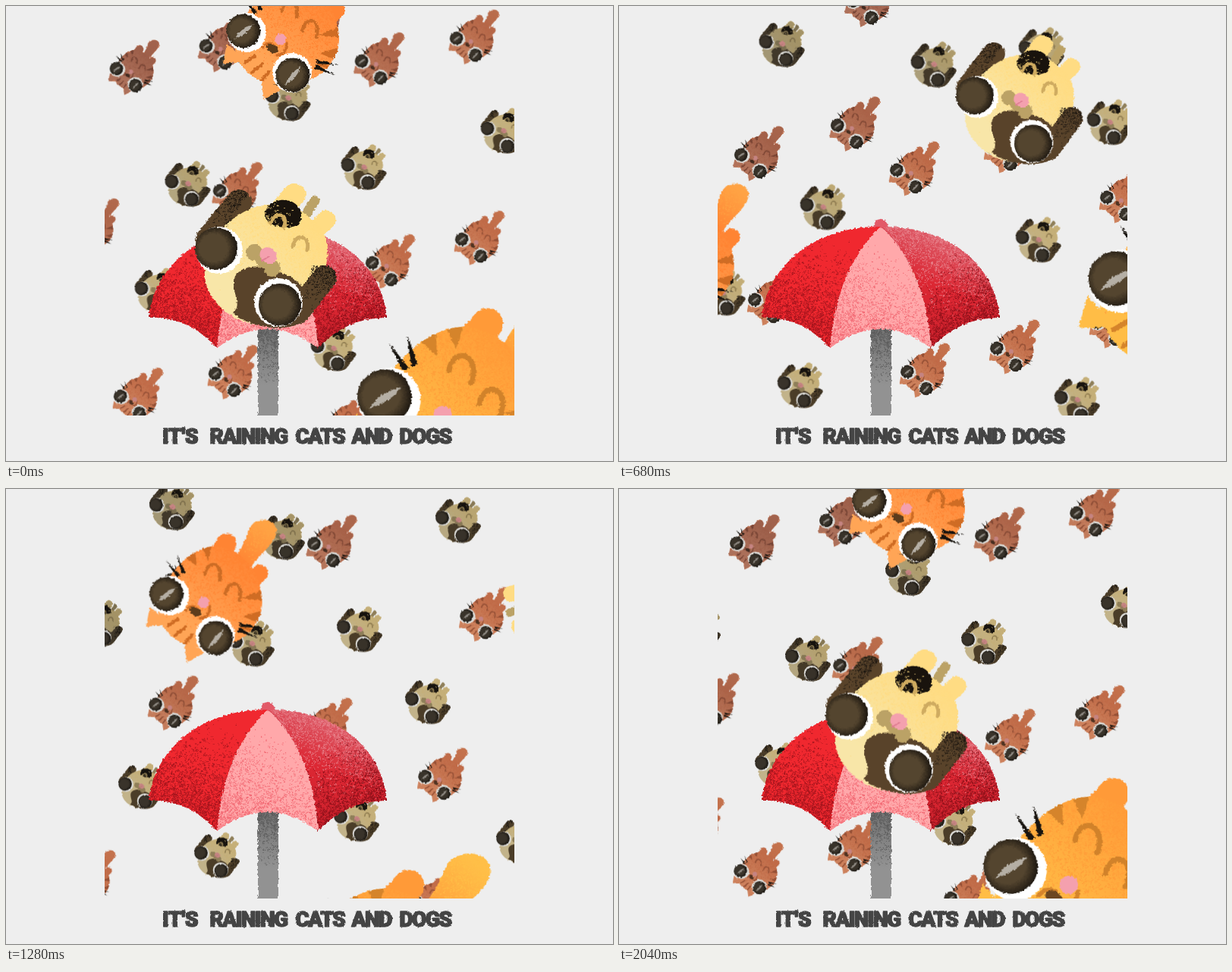
An HTML page with a canvas for the animation above (2080 ms loop, 800 by 600 pixels).

```html
<!DOCTYPE html>
<html lang="en">
<head>
<meta charset="utf-8">
<title>It's raining cats and dogs</title>
<style>
  html, body { margin: 0; width: 800px; height: 600px; overflow: hidden; background: #eee; }
  canvas { position: absolute; left: 130px; top: 0; }
  svg { position: absolute; left: 0; top: 540px; }
  text { font: 900 28px Roboto, sans-serif; letter-spacing: -1.5px; fill: #444; stroke: #444; stroke-width: 1.6; stroke-linejoin: round; }
</style>
</head>
<body>
<canvas id="sky" width="540" height="540"></canvas>
<svg width="800" height="60">
  <filter id="rough" x="-2%" y="-10%" width="104%" height="120%">
    <feTurbulence type="fractalNoise" baseFrequency=".35" numOctaves="2" seed="4"/>
    <feDisplacementMap in="SourceGraphic" scale="2.4" xChannelSelector="R" yChannelSelector="G"/>
  </filter>
  <text y="37" filter="url(#rough)"><tspan x="206" letter-spacing="0">IT'S</tspan><tspan x="263"> RAINING</tspan><tspan x="376"> CATS</tspan><tspan x="450"> AND</tspan><tspan x="513"> DOGS</tspan></text>
</svg>
<script>
const STEP = 40, STEPS = 52, HALF = STEPS / 2, PAD = 4;
const stage = document.getElementById('sky').getContext('2d');
stage.translate(-130, 0);

let seed = 7;
function rand() {
  seed = (seed + 0x6D2B79F5) | 0;
  let t = Math.imul(seed ^ (seed >>> 15), 1 | seed);
  t = (t + Math.imul(t ^ (t >>> 7), 61 | t)) ^ t;
  return ((t ^ (t >>> 14)) >>> 0) / 4294967296;
}
const clamp = v => Math.max(0, Math.min(1, v));

// Small drawing kit in model coordinates
class Pen {
  constructor(g, box, scale) { Object.assign(this, { g, box, scale }); }
  fill(d, style) {
    this.g.fillStyle = style;
    this.g.fill(new Path2D(d));
  }
  line(d, style, width) {
    const g = this.g;
    g.strokeStyle = style;
    g.lineWidth = width;
    g.lineCap = g.lineJoin = 'round';
    g.stroke(new Path2D(d));
  }
  oval(x, y, rx, ry, style, turn = 0) {
    const g = this.g;
    g.beginPath();
    g.ellipse(x, y, rx, ry, turn, 0, 7);
    g.fillStyle = style;
    g.fill();
  }
  disc(x, y, r, style) { this.oval(x, y, r, r, style); }
  ramp(x0, y0, x1, y1, ...colors) {
    const ramp = this.g.createLinearGradient(x0, y0, x1, y1);
    colors.forEach((c, i) => ramp.addColorStop(i / (colors.length - 1), c));
    return ramp;
  }
  clipped(d, paint) {
    this.g.save();
    this.g.clip(new Path2D(d));
    paint();
    this.g.restore();
  }
  // Dots that grow denser from the first point to the second
  grain(d, style, density, x0, y0, x1, y1) {
    const [l, t, r, b] = this.box, k = this.scale, dx = x1 - x0, dy = y1 - y0;
    const size = 1.2 / k, count = (r - l) * (b - t) * k * k * density;
    this.clipped(d, () => {
      this.g.fillStyle = style;
      for (let i = 0; i < count; i++) {
        const x = l + rand() * (r - l), y = t + rand() * (b - t);
        const depth = clamp(((x - x0) * dx + (y - y0) * dy) / (dx * dx + dy * dy));
        if (rand() < depth * depth) this.g.fillRect(x, y, size, size);
      }
    });
  }
  eye(x, y, r, wx, wy, wr, p) {
    this.disc(wx, wy, wr, p.white);
    const glow = this.g.createRadialGradient(x - r * .15, y - r * .05, r * .3, x - r * .1, y, r * 1.1);
    glow.addColorStop(0, p.iris);
    glow.addColorStop(.45, p.iris);
    glow.addColorStop(1, p.rim);
    this.disc(x, y, r, glow);
  }
}

// Crumbles the outlines by shifting tiny blocks
function roughen(canvas, amount) {
  const g = canvas.getContext('2d'), { width: w, height: h } = canvas;
  const from = g.getImageData(0, 0, w, h), to = g.createImageData(w, h);
  const a = new Uint32Array(from.data.buffer), b = new Uint32Array(to.data.buffer);
  const cols = (w >> 1) + 1;
  const shift = Array.from({ length: cols * ((h >> 1) + 1) * 2 }, () => Math.round((rand() * 2 - 1) * amount));
  for (let y = 0; y < h; y++) for (let x = 0; x < w; x++) {
    const i = 2 * ((y >> 1) * cols + (x >> 1)), sx = x + shift[i], sy = y + shift[i + 1];
    if (sx >= 0 && sy >= 0 && sx < w && sy < h) b[y * w + x] = a[sy * w + sx];
  }
  g.putImageData(to, 0, 0);
}

function sprite(draw, box, anchor, scale, palette, amount) {
  const [l, t, r, b] = box, canvas = document.createElement('canvas');
  canvas.width = Math.ceil((r - l) * scale) + 2 * PAD;
  canvas.height = Math.ceil((b - t) * scale) + 2 * PAD;
  const g = canvas.getContext('2d');
  g.translate(PAD, PAD);
  g.scale(scale, scale);
  g.translate(-l, -t);
  draw(new Pen(g, box, scale), palette);
  roughen(canvas, amount);
  return { canvas, x: (anchor[0] - l) * scale + PAD, y: (anchor[1] - t) * scale + PAD };
}

function put(s, x, y, degrees = 0, scale = 1, alpha = 1) {
  stage.save();
  stage.globalAlpha = alpha;
  stage.translate(x, y);
  stage.rotate(degrees * Math.PI / 180);
  stage.scale(scale, scale);
  stage.drawImage(s.canvas, -s.x, -s.y);
  stage.restore();
}

function drawCat(pen, p) {
  const body = 'M150 215C152 185 165 165 178 152C195 132 215 126 228 127C262 130 288 165 287 203C285 228 268 246 250 254C215 269 160 262 150 215Z';
  const tail = 'M246 152Q263 126 269 106C275 88 304 88 306 104C308 122 282 136 266 164Z';
  pen.fill(tail, pen.ramp(256, 150, 292, 98, p.top, p.tip));
  pen.grain(tail, p.tip, .4, 256, 150, 292, 98);
  pen.line('M226 142L240 123', p.top, 26);
  pen.line('M268 178L284 162', p.top, 22);
  pen.fill('M139 206L134 233L164 230ZM184 252L188 280L212 266Z', p.low);
  pen.fill(body, pen.ramp(262, 130, 185, 225, p.top, p.low));
  pen.grain(body, p.top, .5, 170, 250, 270, 125);
  pen.clipped(body, () => {
    pen.fill('M183 140L198 129L201 153ZM206 127L221 124L216 146ZM290 184L290 199L260 195ZM290 211L284 229L261 219Z', p.stripe);
    pen.line('M163 232L176 223M172 245L186 233M184 256L195 243M260 234L275 238', p.stripe, 4);
  });
  pen.line('M212 164C213 145 237 146 231 172M239 189C242 170 264 172 257 198', p.line, 4.5);
  pen.line('M205 222Q217 222 218 206M186 212Q192 204 199 207', p.stripe, 3.5);
  pen.disc(210, 201, 7.5, p.tongue);
  pen.oval(199, 213, 8, 5.5, p.nose, .5);
  pen.eye(161, 190, 22.5, 165, 192, 26, p);
  pen.eye(226, 248, 22.5, 225, 245, 26, p);
  pen.fill('M149 201Q156 187 174 181Q168 193 149 201ZM216 261Q220 247 236 237Q233 251 216 261Z', p.slit);
  pen.fill('M161 146L179 165L174 167ZM175 138L186 161L181 164ZM257 227L286 235L258 233ZM256 234L282 248L255 240Z', '#18140f');
}

function drawDog(pen, p) {
  const body = 'M262 345C258 380 290 415 330 420C380 425 425 370 424 320C422 285 385 262 350 262C310 262 265 300 262 345Z';
  const patch = 'M300 365C300 345 330 338 350 348C385 356 407 380 402 405C390 430 335 432 298 405C312 395 300 385 300 365Z';
  const spot = 'M341 278C340 262 358 252 374 257C390 262 392 280 386 288C372 296 348 292 341 278Z';
  pen.line('M360 272L380 249', p.top, 30);
  pen.line('M402 300L422 282', p.top, 25);
  pen.line('M393 278L407 257', p.tan, 13);
  pen.line('M267 308L307 259', p.brown, 34);
  pen.fill(body, pen.ramp(400, 280, 300, 370, p.top, p.low));
  pen.grain(body, p.top, .5, 290, 390, 410, 270);
  pen.fill(patch, p.brown);
  pen.line('M385 403L420 358', p.brown, 32);
  pen.g.globalCompositeOperation = 'source-atop';
  pen.grain('M244 330V230H331L285 300Z', p.black, .6, 270, 304, 322, 240);
  pen.grain('M380 425L404 342H440V380L412 400Z', p.black, .6, 390, 398, 434, 340);
  pen.g.globalCompositeOperation = 'source-over';
  pen.fill(spot, p.black);
  pen.grain(spot, p.top, .15, 380, 260, 350, 290);
  pen.line('M349 286C354 270 374 274 366 292M378 318C380 298 402 302 397 322', p.line, 5);
  pen.disc(327, 325, 11, p.tan);
  pen.disc(338, 336, 9, p.tan);
  pen.disc(351, 346, 11, p.tan);
  pen.oval(346, 329, 12, 10, p.tongue, .6);
  pen.line('M337 336L347 330', p.crease, 2);
  pen.eye(277, 320, 28, 281, 322, 31, p);
  pen.eye(361, 394, 28, 359, 391, 32, p);
}

function drawUmbrella(pen) {
  const left = 'M345 291C265 289 196 338 188 411Q238 407 278 451Q287 345 345 291Z';
  const right = 'M345 291C430 289 496 338 502 411Q450 410 411 451Q404 345 345 291Z';
  const middle = 'M345 291Q287 345 278 451Q345 401 411 451Q404 345 345 291Z';
  const pole = 'M332 420H359V545H332Z';
  pen.fill(pole, pen.ramp(0, 425, 0, 500, '#727272', '#929292'));
  pen.grain(pole, '#5c5c5c', .5, 345, 510, 345, 425);
  pen.fill('M335 294Q335 288 339 283Q346 278 351 284Q355 289 355 294Z', '#e25a68');
  pen.fill(left, '#f0282f');
  pen.grain(left, '#a5161e', .9, 270, 290, 215, 465);
  pen.fill(right, pen.ramp(440, 305, 390, 430, '#dc5f6c', '#dc2733', '#cf222d'));
  pen.grain(right, '#e8808a', .4, 400, 420, 430, 300);
  pen.grain(right, '#8f121b', .9, 410, 340, 480, 450);
  pen.fill(middle, '#ffa8aa');
  pen.grain(middle, '#f26a74', .6, 370, 310, 300, 470);
}

const eyes = { white: '#fff', iris: '#54452f', rim: '#1d1710', slit: '#b5afa5', tongue: '#f4a0ae', crease: '#df7d92' };
const dimEyes = { white: '#dbdad6', iris: '#39332a', rim: '#171410', slit: '#8f8a83', tongue: '#c58482', crease: '#a96c6c' };
const palettes = {
  orange: { ...eyes, top: '#ff8433', low: '#ffa556', tip: '#ffa445', stripe: '#cf6c24', line: '#cc6c25', nose: '#5c3c1c' },
  yellow: { ...eyes, top: '#ff9a38', low: '#ffbd46', tip: '#ffbf48', stripe: '#d5842b', line: '#d1822a', nose: '#6b4620' },
  rust: { ...dimEyes, top: '#c06b48', low: '#cd815c', tip: '#c5734e', stripe: '#965035', line: '#995338', nose: '#503322' },
  umber: { ...dimEyes, top: '#9d5f4a', low: '#ac705a', tip: '#a3644e', stripe: '#774435', line: '#7b4737', nose: '#432c22' },
  cream: { ...eyes, top: '#ffdc83', low: '#f8e6a8', tan: '#bba266', brown: '#59432a', black: '#19130d', line: '#cfab60' },
  sand: { ...dimEyes, top: '#c5af78', low: '#c2b38a', tan: '#8f7f59', brown: '#4b3d28', black: '#17130e', line: '#917e52' },
  moss: { ...dimEyes, top: '#a49366', low: '#a29674', tan: '#7b6f50', brown: '#41382a', black: '#17130e', line: '#7c6e4c' }
};

const catBox = [130, 88, 308, 284], dogBox = [242, 226, 444, 432];
const catMid = [219, 186], dogMid = [342, 331], catEye = [161, 190];
const smallCat = p => sprite(drawCat, catBox, catMid, .385, p, .58);
const smallDog = p => sprite(drawDog, dogBox, dogMid, .315, p, .58);
const orangeCat = sprite(drawCat, catBox, catEye, 1, palettes.orange, .75);
const yellowCat = sprite(drawCat, catBox, catEye, 1.6, palettes.yellow, .8);
const bigDog = sprite(drawDog, dogBox, dogMid, 1, palettes.cream, .75);
const umbrella = sprite(drawUmbrella, [180, 275, 510, 545], [0, 0], 1, null, .75);

const crowd = [
  {
    near: smallCat(palettes.rust), far: smallCat(palettes.umber),
    places: [[168, 81], [286, 51], [491, 71], [616, 41], [304, 242], [115, 290], [505, 337], [623, 306], [768, 107], [413, 12], [755, 272], [275, -223]]
  },
  {
    near: smallDog(palettes.sand), far: smallDog(palettes.moss),
    places: [[371, 122], [239, 235], [471, 213], [655, 165], [199, 376], [431, 452], [341, 357], [706, 376], [676, 491], [317, -93], [412, -246], [869, 194], [894, 50]]
  }
];

function drawCrowd(step) {
  for (const { near, far, places } of crowd)
    for (const [x0, y0] of places)
      for (let k = -1; k <= 1; k++) {
        const x = x0 + 318 * k - 6.05 * step, y = y0 - 442 * k + 8.45 * step;
        if (x < 90 || x > 710 || y < -45 || y > 585) continue;
        put(near, x, y);
        put(far, x, y, 0, 1, clamp((470 - .6 * x - y) / 200));
      }
}

// Falls onto the umbrella, then flies off upside down
function drawBouncer(step) {
  const fall = step - 17, flight = step - 27;
  if (step < 25) put(bigDog, 527 - 17 * fall, 126 + 17 * fall, -2, .89);
  else put(bigDog, 503 + 48.5 * flight, 235 - 18.4 * flight, 188 + 5.4 * flight, .85);
}

function render(step) {
  stage.clearRect(130, 0, 540, 540);
  drawCrowd(step);
  put(umbrella, 0, 0);
  for (const q of [step % HALF, step % HALF - HALF]) {
    put(orangeCat, 313 - 16.9 * q, 33 + 17.6 * q);
    put(yellowCat, 499 - 17.3 * q, 515 + 17.3 * q, 5);
  }
  drawBouncer(step);
  const fall = step < HALF ? step : step - STEPS;
  put(bigDog, 342 - 23.1 * fall, 331 + 22.4 * fall);
}

let start;
function tick(now) {
  start ??= now;
  render(Math.floor((now - start) / STEP) % STEPS);
  requestAnimationFrame(tick);
}
render(0);
requestAnimationFrame(tick);
</script>
</body>
</html>
```
